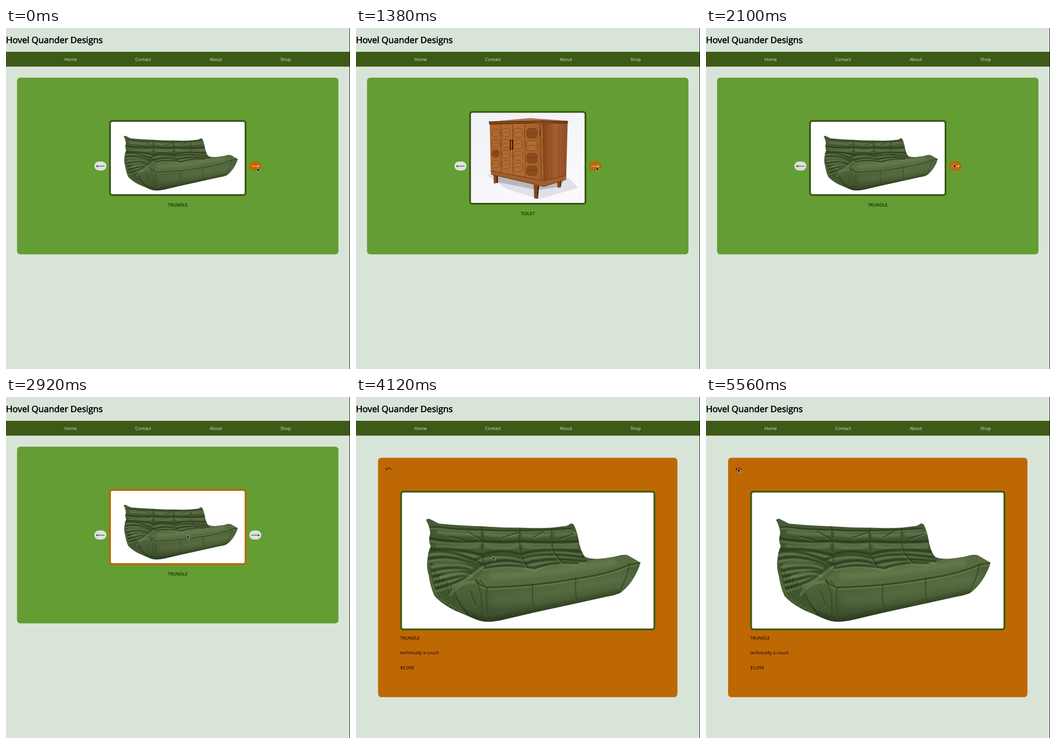
Write an HTML page with a canvas that moves like this. It is 751 by 745 pixels and loops after 5720 ms.

```html
<!DOCTYPE html>
<html lang="en">
<head>
<meta charset="utf-8">
<title>Furniture shop</title>
<style>
html, body { margin: 0; width: 100%; height: 100%; overflow: hidden; background: #d9e4d9; }
canvas { display: block; }
</style>
</head>
<body>
<canvas id="stage" width="751" height="745"></canvas>
<script>
const ctx = document.getElementById('stage').getContext('2d');
ctx.textRendering = 'geometricPrecision';
const LOOP = 5720, STEP = 80;
const PALE = '#d9e4d9', MOSS = '#3d5a17', LEAF = '#649d33', RUST = '#be6804';
const FONT = '"Open Sans", "Noto Sans", sans-serif';

// x, y, width, height of each picture frame
const SLIDES = {
  sofa: [225, 201, 300, 166],
  cabinet: [247, 181.5, 256, 204.5],
  lamp: [227.5, 122, 295.5, 324]
};
const DETAIL = [96.4, 204.8, 557.1, 305];

// start time, number of steps, points passed
const MOVES = [
  [820, 8, [548, 305], [524, 303]],
  [1620, 5, [524, 303], [540, 297]],
  [2430, 3, [540, 297], [395, 300]],
  [2920, 1, [395, 300], [395, 301]],
  [3160, 7, [395, 301], [118, 527]],
  [3720, 8, [118, 527], [165, 510], [240, 440], [298, 348], [295, 231]],
  [4360, 8, [295, 231], [245, 130], [190, 78], [130, 110], [109, 160]],
  [5000, 8, [109, 160], [92, 142], [80, 169], [69, 156]]
];

function cursorAt(t) {
  let at = MOVES[0][2];
  for (const [start, steps, ...pts] of MOVES) {
    if (t < start) break;
    const n = Math.min(steps, Math.floor((t - start) / STEP) + 1);
    const u = n / steps * (pts.length - 1);
    const i = Math.min(Math.floor(u), pts.length - 2);
    at = pts[i].map((v, k) => v + (pts[i + 1][k] - v) * (u - i));
  }
  return at;
}

function box(x, y, w, h, r, color) {
  ctx.fillStyle = color;
  ctx.beginPath();
  ctx.roundRect(x, y, w, h, r);
  ctx.fill();
}

function fill(d, color) {
  ctx.fillStyle = color;
  ctx.fill(new Path2D(d));
}

function line(d, color, width) {
  ctx.strokeStyle = color;
  ctx.lineWidth = width;
  ctx.stroke(new Path2D(d));
}

// stroke with a feathered edge
function glow(d, rgb, alpha, width) {
  for (let k = 1; k <= 4; k++) line(d, `rgba(${rgb},${alpha / 4})`, width * k / 4);
}

function text(str, x, y, color = '#000', size = 9.65, align = 'left') {
  ctx.font = `${size}px ${FONT}`;
  ctx.textAlign = align;
  ctx.fillStyle = color;
  ctx.fillText(str, x, y);
}

function shade(x0, y0, x1, y1, ...colors) {
  const g = ctx.createLinearGradient(x0, y0, x1, y1);
  colors.forEach((c, i) => g.addColorStop(i / (colors.length - 1), c));
  return g;
}

// soft crease with a lit ridge below it
function crease(d, size = 1) {
  ctx.save();
  ctx.translate(0, 6 * size);
  glow(d, '140,160,116', .36, 8 * size);
  ctx.restore();
  glow(d, '28,42,20', .75, 8 * size);
}

function sofa() {
  const body = 'M153 269Q155 265 161 266.5L181 276.5Q225 281 274 282.5Q316 285.5 358 285.5Q400 287 427 285.5L460 281.5L470 276L475 278' +
    'Q483 293 486 313Q490 336 499 348Q506 354 530 353.5Q558 351 574 346.5Q584 343.5 593 345.5L621 362Q619 371 613 383' +
    'Q599 412 577 428Q566 433 548 436L480 451L388 471L320 487Q300 491.5 284 491Q272 490 262 486L215 466Q184 450 171 434Q162 414 159 391' +
    'Q153 372 156 354Q157 340 163 326Q157 313 162 298Q161 283 153 269Z';
  fill(body, shade(0, 270, 0, 490, '#495c38', '#41532f', '#495d36', '#50653b', '#485c35', '#3a4b2a'));
  ctx.save();
  ctx.clip(new Path2D(body));
  ctx.lineCap = ctx.lineJoin = 'round';

  // seat cushion and its front
  fill('M262 400Q275 373 350 374Q420 375 480 364Q540 349 593 346L621 362Q540 390 480 397Q380 414 285 416Z', '#566b40');
  glow('M300 391Q400 389 560 361', '130,150,105', .3, 24);
  glow('M310 445Q400 437 590 392', '110,133,82', .28, 36);
  glow('M160 440Q215 475 290 492L480 452L570 432', '30,42,22', .5, 26);

  // back cushions
  const sheen = (d, width) => glow(d, '126,148,102', .55, width);
  sheen('M181 295Q225 301 268 299M283 299Q320 304 352 302M366 302Q400 304 424 300M437 300L479 298', 13);
  sheen('M178 327Q220 330 267 326M283 326Q320 333 353 326M368 326Q400 333 481 327', 11);
  crease('M162 284L181 284Q225 290 274 290Q358 295 470 287', .55);
  crease('M162 309Q205 318 274 314Q320 319 358 315Q427 319 488 315', .9);
  crease('M163 333Q215 328 275 345Q315 330 360 344Q405 327 490 338', 1.1);
  crease('M262 354Q315 336 361 352Q410 336 496 350', .95);
  crease('M274 368Q325 348 370 364Q420 348 500 358');
  crease('M280 374Q330 361 390 374Q430 357 485 363', .8);
  crease('M274 283Q278 318 275 345L282 373M358 286Q355 323 361 349L374 372M427 287Q425 320 432 341L450 361', .6);
  crease('M244 294L270 309M207 305L235 312M389 306L409 294M320 307L354 296M446 309L474 299', .45);

  // pleats wrapping the left arm
  for (let i = 0; i < 7; i++) {
    const y = 340 + i * 13, x = 158 + i * 3;
    crease(`M${x} ${y}Q${203 + i * 3} ${y - 12} ${276 - i * 5} ${365 + i * 4}`);
    crease(`M${162 + i * 9} ${373 + i * 8}Q${168 + i * 7} ${410 + i * 4} ${184 + i * 10} ${439 + i * 6}`, .8);
  }
  sheen('M170 366Q205 353 254 374M185 394Q215 377 253 391M207 432Q225 404 258 404', 8);

  // piping and front seams
  crease('M262 400Q268 412 285 416Q385 414 480 397Q550 387 596 367L621 362', .6);
  crease('M386 412Q383 440 390 470M480 397Q477 422 483 451M598 365Q591 399 573 431', .5);
  crease('M262 402Q279 434 273 490M271 401L280 413M286 418Q282 450 290 490M250 425L260 454', .5);
  ctx.restore();
}

function cabinet() {
  ctx.fillStyle = shade(251, 185, 340, 382, '#f0f0f7', '#f4f4fa', '#f9f9fc');
  ctx.fillRect(247, 181, 256, 205);
  fill('M285 321L320 315L465 328L485 349L400 374L330 352Z', 'rgba(176,179,199,.35)');
  fill('M300 324L455 330L447 346L397 354L310 337Z', 'rgba(100,83,83,.3)');

  // feet
  fill('M300 319H310V338L301 340ZM388 342L400 345L397 373L389 372ZM439 332L449 330L447 348L440 349Z', '#854719');
  fill('M307 322H310V338L307 339ZM396 344L400 345L397 373H395ZM446 332L449 330L447 348H445Z', '#542809');

  fill('M292 209L406 207L409 334L294 312Z', shade(292, 0, 409, 0, '#ad652d', '#b36b31', '#a25c27'));
  fill('M406 207L462 207L459 322L409 334Z', shade(407, 0, 462, 0, '#85451b', '#a66030', '#92502a'));
  for (let i = 0; i < 9; i++) {
    const x = 411 + i * 5.6;
    line(`M${x} 210L${x - i * .2} ${332 - i * 1.3}`, `rgba(82,38,12,${i % 3 ? .12 : .25})`, 1.2);
  }
  fill('M294 311L409 333L459 321L459 330L410 347L295 320Z', '#a25f2e');
  line('M294 312L409 334L459 322M296 320L410 346L459 331', '#65320f', 1.2);

  // top slab
  fill('M290 205L380 197L463 203L462 208L408 206L291 211Z', '#894a20');
  fill('M290 205L380 197L463 203L409 203Z', '#b2784c');
  line('M290 205L409 203L463 205M291 210L408 207L462 208', '#512609', 1.3);

  // doors
  line('M316 210L317 316M342 209L343 321M368 208L370 326M402 208L405 332', '#70380f', 1);
  const cols = [[305, 8, 229, 22.7], [327.5, 9, 229, 23.4], [353.5, 10, 229, 25.2], [384, 11.5, 230, 27.2]];
  cols.forEach(([cx, rx, y0, gap], c) => {
    for (let r = 0; r < 4; r++) {
      const cy = y0 + r * gap, ry = 8 + c * .9, k = 4;
      const d = `M${cx - rx} ${cy - ry + k}l${k} ${-k}H${cx + rx - k}l${k} ${k}V${cy + ry - k}l${-k} ${k}H${cx - rx + k}l${-k} ${-k}Z`;
      const dark = (c === 0 && r === 2) || (c === 3 && r !== 1);
      fill(d, dark ? '#8b4a1d' : '#b16b34');
      line(d, '#753b13', .9);
      line(`M${cx - rx + 3} ${cy + 2}Q${cx} ${cy - 5} ${cx + rx - 3} ${cy + 1}`, 'rgba(100,48,14,.3)', 2);
    }
  });
  line('M337 243V267M341.5 243V267', '#211006', 1.7);
  line('M334 247H344M334 263H344M402 223V235', '#30180a', 1.2);
}

function lamp() {
  ctx.lineJoin = ctx.lineCap = 'round';
  fill('M327 229L374 226Q373 247 356 249Q342 248 327 229Z', '#f3eee9');
  line('M354 179L357 173M358 179L360 174', '#a58a55', 2.5);
  line('M353 173L356 177', '#423723', 1.5);
  line('M374 237L449 335', '#211c18', 6);
  line('M376 237L447 330', '#50473f', 1);
  line('M449 335L477 373', '#211c18', 3.6);
  line('M300 373L328 335L445 332.5L454 335L395 367L378.5 421', '#36322d', 3);
  line('M329 334L443 332M450 336L395 366', '#6b645d', .7);
  for (const [x, y] of [[300, 373], [378.5, 422], [477.5, 373]]) box(x - 1.7, y - 1.7, 3.4, 3.4, 1.7, '#221d19');
  fill('M263 211Q264 205 276 196L310 174Q322 167 333 168Q350 169 362 179Q372 189 373 210L374 227Q350 231 315 229Q280 227 267 218Q262 215 263 211Z',
    shade(263, 215, 374, 190, '#79695e', '#30261f', '#17110d', '#30261e', '#17120e'));
  line('M268 217Q282 226 315 228Q350 230 373 226', '#4c4037', 1.1);
}

const ART = { sofa, cabinet, lamp };

function picture(name, [x, y, w, h], border) {
  box(x, y, w, h, 7, border);
  box(x + 4, y + 4, w - 8, h - 8, 3.5, '#fff');
  ctx.save();
  ctx.beginPath();
  ctx.roundRect(x + 4, y + 4, w - 8, h - 8, 3.5);
  ctx.clip();
  if (name === 'sofa') {
    const k = (w - 8) / (DETAIL[2] - 8);
    ctx.translate(x + 4, y + 4);
    ctx.scale(k, k);
    ctx.translate(-DETAIL[0] - 4, -DETAIL[1] - 4);
  }
  ART[name]();
  ctx.restore();
}

const inside = ([px, py], [x, y, w, h]) => px >= x && px <= x + w && py >= y && py <= y + h;

function button(rect, dir, tip) {
  const [x, y, w, h] = rect, hot = inside(tip, rect);
  box(x, y, w, h, 10, hot ? '#a95c04' : '#bccbb6');
  box(x + .6, y + .6, w - 1.2, h - 1.2, 9.5, hot ? RUST : '#dae4dc');
  ctx.save();
  ctx.translate(x + w / 2, y + h / 2 + .4);
  ctx.scale(dir, 1);
  ctx.lineCap = 'butt';
  line('M-9 0H8.5M5.5 -2.5Q6.5 -.7 9 0Q6.5 .7 5.5 2.5', hot ? '#e6e3d4' : '#111', 1);
  ctx.restore();
}

function carousel(name, caption, tip) {
  const frame = SLIDES[name], [x, y, w, h] = frame;
  box(24.1, 108.5, 701.7, 386, 7, LEAF);
  picture(name, frame, inside(tip, frame) ? RUST : MOSS);
  button([x - 32.3, 291.5, 26.6, 20], -1, tip);
  button([x + w + 6, 291.5, 26.6, 20], 1, tip);
  text(caption, 375, y + h + 22.5, '#000', 9.65, 'center');
}

function detail() {
  box(48.2, 132.7, 653.5, 523.1, 7, RUST);
  line('M66 158.5Q68 155 71.5 155Q75.5 155 77 159.5M65.5 155.5L66 159L69.5 159.5', '#15100a', 1.1);
  picture('sofa', DETAIL, MOSS);
  text('TRUNDLE', 96.4, 529.5);
  text('technically a couch', 96.4, 562);
  text('$5,099', 96.4, 594.5);
}

function header() {
  ctx.fillStyle = PALE;
  ctx.fillRect(0, 0, 751, 745);
  const name = 'Hovel Quander Designs';
  text(name, 0, 33, '#000', 19.3);
  ctx.strokeStyle = '#000';
  ctx.lineWidth = .7;
  ctx.strokeText(name, 0, 33);
  ctx.fillStyle = MOSS;
  ctx.fillRect(0, 52, 750, 32.4);
  [['Home', 127.5], ['Contact', 282], ['About', 444.5], ['Shop', 599]].forEach(([s, x]) => text(s, x, 72, PALE));
}

function pointer([x, y]) {
  ctx.save();
  ctx.translate(x, y);
  ctx.lineJoin = 'round';
  const d = 'M.6 .5V8.1L2.4 6.5L3.8 9.5L5.2 8.9L3.9 6H6.3Z';
  line(d, '#e4e7df', 1.2);
  fill(d, '#151515');
  ctx.restore();
}

function draw(t) {
  const tip = cursorAt(t);
  header();
  if (t >= 3080) detail();
  else {
    const name = t >= 80 && t < 1460 ? 'cabinet' : t >= 1460 && t < 2100 ? 'lamp' : 'sofa';
    const caption = t < 80 || t >= 2100 ? 'TRUNDLE' : t < 1380 ? 'NIGHTSTAND' : 'TOILET';
    carousel(name, caption, tip);
  }
  ctx.fillStyle = '#000';
  ctx.fillRect(750, 0, 1, 745);
  pointer(tip);
}

const began = performance.now();
function tick() {
  draw((performance.now() - began) % LOOP);
  requestAnimationFrame(tick);
}
tick();
</script>
</body>
</html>
```
